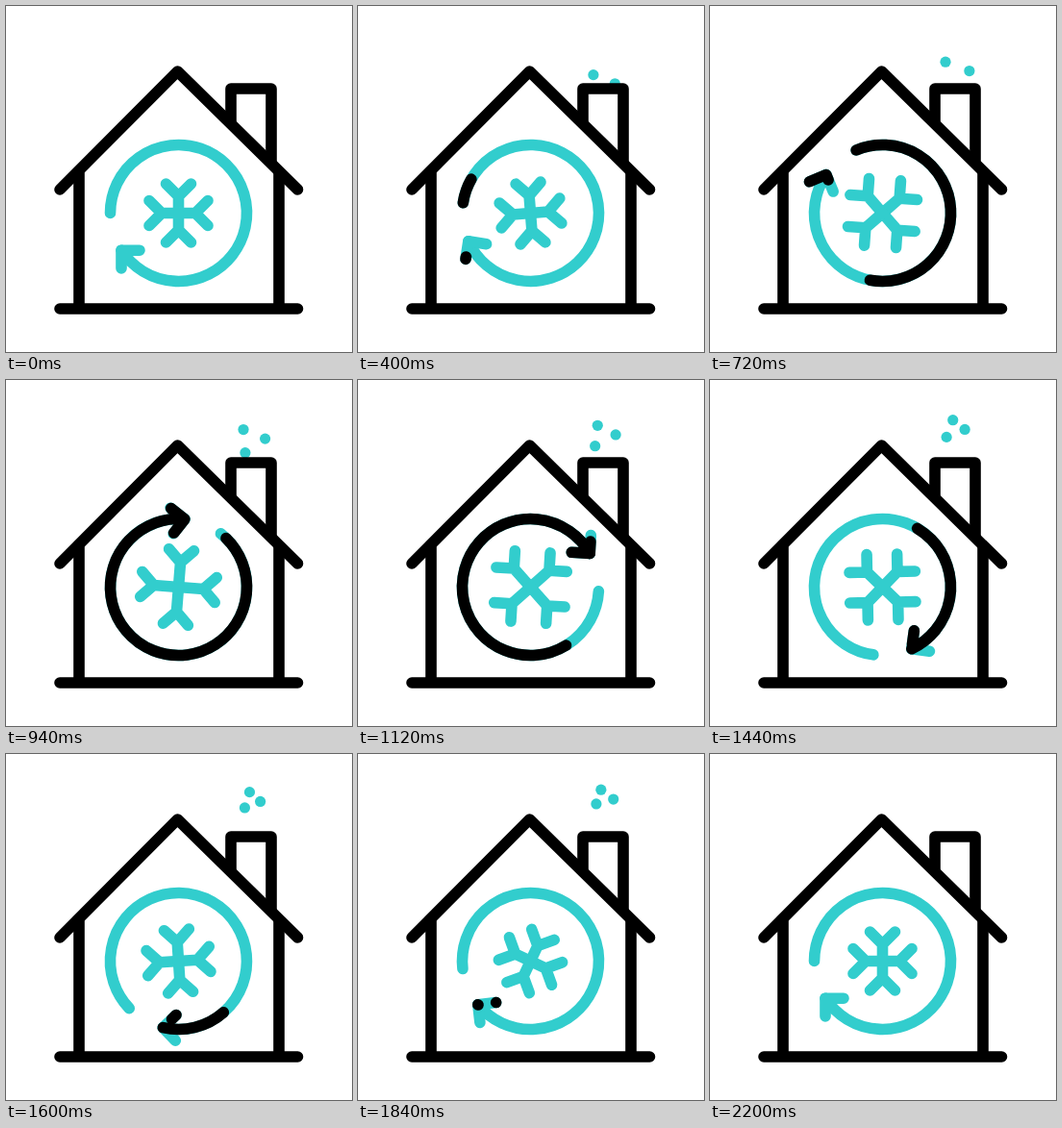
Recreate the animation shown at these times as an HTML page. Size 360 px wide and 360 px high, loop 2400 ms.

```html
<!DOCTYPE html>
<html lang="en">
<head>
<meta charset="utf-8">
<title>Home cooling</title>
<style>
  html, body { margin: 0; width: 100%; height: 100%; overflow: hidden; background: #fff; }
  svg { display: block; width: 100vw; height: 100vh; }
  .line { fill: none; stroke-width: 11.6; stroke-linecap: round; stroke-linejoin: round; }
  .ice { stroke: #32cdcd; }
  .ink { stroke: #000; }
</style>
</head>
<body>
<svg viewBox="0 0 360 360">
  <defs>
    <path id="arm"/>
    <g id="arrow">
      <path pathLength="1" d="M-71 0A71 71 0 1 1 -59.5 38.7"/>
      <path pathLength="1" d="M-59.5 57.5V38.7H-40.5"/>
    </g>
  </defs>
  <g id="smoke" fill="#32cdcd"></g>
  <path d="M234 86H276V170L234 125Z" fill="#fff"/>
  <g class="line ink">
    <path d="M234 120V86H276V162"/>
    <path d="M56 191L178.5 68L303.5 191"/>
    <path d="M76 174V315M284 174V315M56 315H303.5"/>
  </g>
  <g class="line" transform="translate(179.5 215.5)">
    <g id="flake" class="ice">
      <use href="#arm"/>
      <use href="#arm" transform="rotate(90)"/>
      <use href="#arm" transform="rotate(180)"/>
      <use href="#arm" transform="rotate(270)"/>
    </g>
    <g id="cycle">
      <use href="#arrow" class="ice"/>
      <use href="#arrow" class="ink" id="trail"/>
    </g>
  </g>
</svg>
<script>
const LOOP = 2400;
const byId = id => document.getElementById(id);
const arm = byId('arm'), flake = byId('flake'), cycle = byId('cycle'), trail = byId('trail');

// Each puff leaves the chimney at `start`, slows towards `top` and sways around `x`
const puffs = [
  { start: 36, top: 30, x: 249, sway: 4.5, peak: 1650, swing: 1100 },
  { start: 155, top: 40, x: 267.3, sway: 2.7, peak: 800, swing: 800 },
  { start: 587, top: 40, x: 247, sway: 2, peak: 900, swing: 400 }
];
for (const puff of puffs) {
  puff.dot = document.createElementNS('http://www.w3.org/2000/svg', 'circle');
  byId('smoke').append(puff.dot);
}

const progress = (t, from, to) => Math.min(1, Math.max(0, (t - from) / (to - from)));
const smooth = (t, from, to) => {
  const u = progress(t, from, to);
  return u * u * (3 - 2 * u);
};

function bezierEase(u, x1, y1, x2, y2) {
  const curve = (s, a, b) => 3 * (1 - s) ** 2 * s * a + 3 * (1 - s) * s * s * b + s ** 3;
  let low = 0, high = 1;
  for (let i = 0; i < 24; i++) {
    const mid = (low + high) / 2;
    if (curve(mid, x1, x2) < u) low = mid; else high = mid;
  }
  return curve(low, y1, y2);
}

function drawCycle(t) {
  cycle.setAttribute('transform', `rotate(${360 * smooth(t, 240, 1980)})`);
  const start = smooth(t, 860, 1860), end = smooth(t, 290, 1005);
  trail.style.display = end > start ? '' : 'none';
  trail.setAttribute('stroke-dasharray', `${end - start} 2`);
  trail.setAttribute('stroke-dashoffset', -start);
}

function drawFlake(t) {
  const reach = 17.5 + 8.5 * (smooth(t, 245, 1000) - smooth(t, 1100, 1850));
  const tip = reach + 13;
  arm.setAttribute('d', `M0 0V${-reach}M-13 ${-tip}L0 ${-reach}L13 ${-tip}`);
  const turn = bezierEase(progress(t, 245, 1985), 0.42, 0, 0.72, 0.82);
  flake.setAttribute('transform', `rotate(${-360 * turn})`);
}

function drawSmoke(t) {
  const radius = 5.6 * (1 - smooth(t, 1900, 2160));
  for (const { start, top, x, sway, peak, swing, dot } of puffs) {
    dot.setAttribute('cx', x + sway * Math.cos(Math.PI * (t - peak) / swing));
    dot.setAttribute('cy', top + (95 - top) * Math.exp(-Math.max(0, t - start) / 820));
    dot.setAttribute('r', radius);
  }
}

function tick() {
  const t = performance.now() % LOOP;
  drawCycle(t);
  drawFlake(t);
  drawSmoke(t);
  requestAnimationFrame(tick);
}
tick();
</script>
</body>
</html>
```
